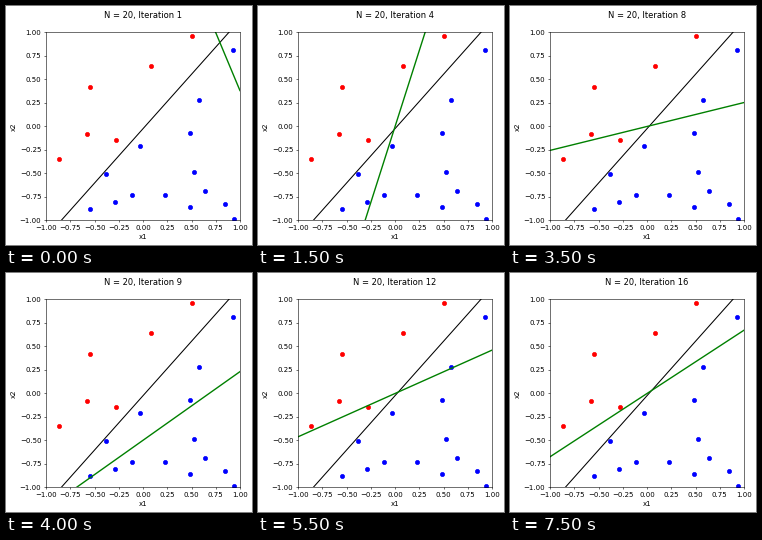
These frames come from a looping animation (246 px wide and 239 px high, 8000 ms). A matplotlib script:

```python
import numpy as np
import matplotlib.pyplot as plt
from matplotlib.animation import FuncAnimation

W, H, DPI = 246, 239, 50
STEPS = 16
SLOPE, OFFSET = 1.156, -0.023

# Sample points in the order the perceptron checks them
POINTS = np.array([
    (0.082, 0.638), (0.505, 0.957), (-0.866, -0.351), (-0.546, -0.883),
    (-0.381, -0.510), (0.928, 0.809), (0.577, 0.277), (0.485, -0.074),
    (-0.031, -0.213), (0.526, -0.489), (0.639, -0.691), (0.845, -0.830),
    (0.938, -0.989), (0.485, -0.862), (0.227, -0.734), (-0.113, -0.734),
    (-0.289, -0.809), (-0.546, 0.415), (-0.577, -0.085), (-0.278, -0.149),
])
START = 2


def true_line(x):
    return SLOPE * x + OFFSET


def train(points, labels, steps):
    """Weights (bias, w1, w2) after each update on the first wrong point."""
    signed = labels[:, None] * np.column_stack([np.ones(len(points)), points])
    history = [signed[START]]
    while len(history) < steps:
        w = history[-1]
        wrong = np.argmax(signed @ w < 0)
        history.append(w + signed[wrong])
    return history


labels = np.sign(POINTS[:, 1] - true_line(POINTS[:, 0]))
weights = train(POINTS, labels, STEPS)
xs = np.linspace(-1, 1)

fig = plt.figure(figsize=(W / DPI, H / DPI), dpi=DPI, facecolor="white")
ax = fig.add_axes([40.2 / W, 24.55 / H, 193.75 / W, 188 / H])
ticks = np.linspace(-1, 1, 9)
ax.set(xlim=(-1, 1), ylim=(-1, 1), xticks=ticks, yticks=ticks,
       xlabel="x1", ylabel="x2")

ax.plot(xs, true_line(xs), "k-")
for label, style in ((1, "ro"), (-1, "bo")):
    ax.plot(*POINTS[labels == label].T, style)
boundary, = ax.plot([], [], "g-", lw=2)
title = fig.text(136.6 / W, 1 - 12 / H, "", size=12, ha="center", va="baseline")


def update(step):
    b, w1, w2 = weights[step]
    boundary.set_data(xs, -(b + w1 * xs) / w2)
    title.set_text(f"N = 20, Iteration {step + 1}")
    return boundary, title


anim = FuncAnimation(fig, update, frames=STEPS, init_func=lambda: update(0),
                     interval=500, repeat=True, repeat_delay=0)
plt.show()
```
